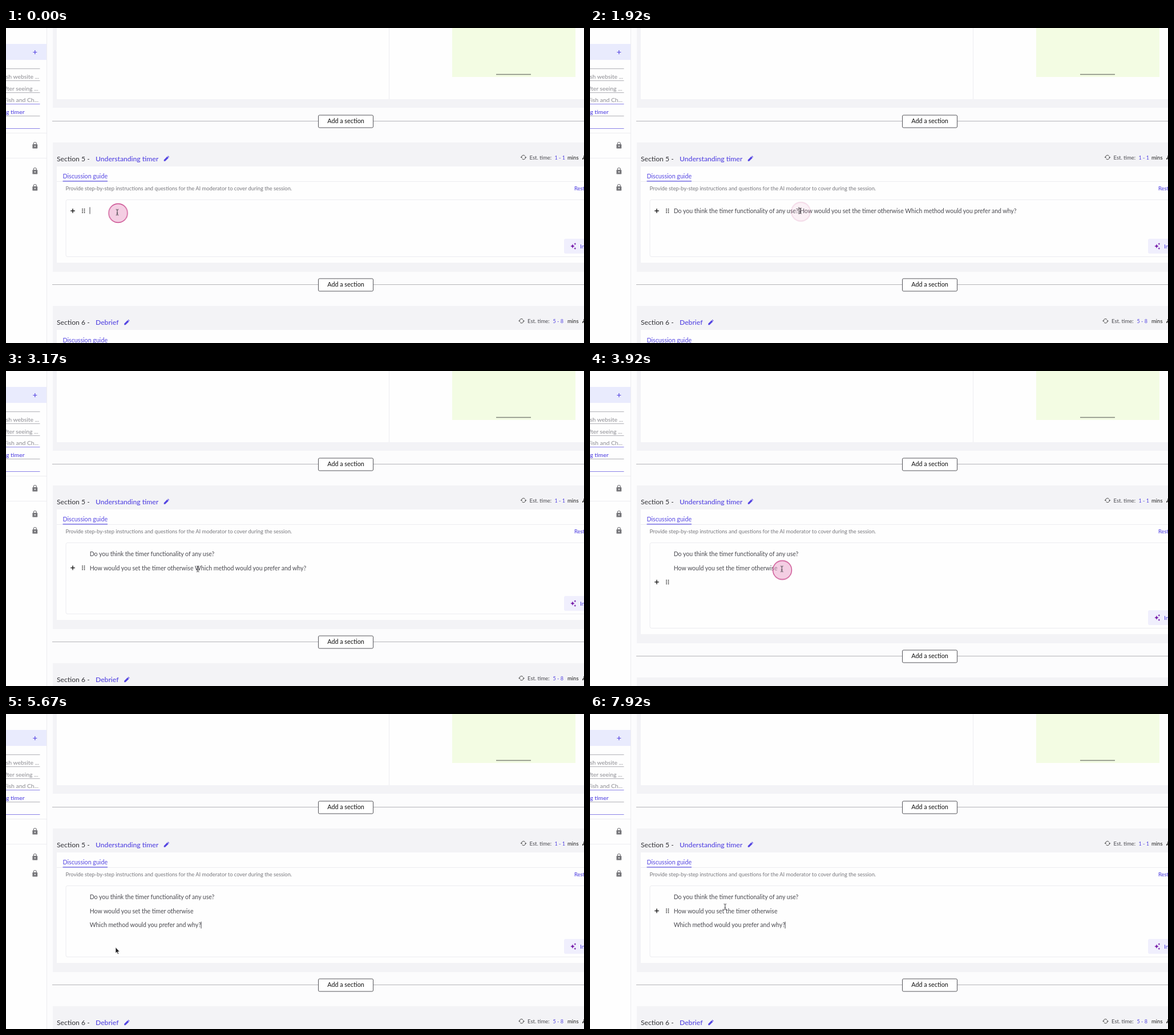
Recreate the animation shown at these times as an HTML page. Size 1013 by 553 pixels, loop 8 s.

```html
<!DOCTYPE html>
<html lang="en">
<head>
<meta charset="utf-8">
<title>Discussion guide editor</title>
<style>
  html, body { margin: 0; width: 100%; height: 100%; overflow: hidden; background: #fdfdfd; }
  svg { display: block; width: 100%; height: 100%; font-family: Lato, "Open Sans", sans-serif; }

  .band { fill: #f3f3f6; }
  .card { fill: #fefefe; }
  .page { fill: #fcfcfd; }
  .accent { fill: #5546e2; }
  .rule { stroke: #ececf0; fill: none; }
  .grey { stroke: #b0b0b6; }
  .violet { stroke: #8a82e8; }
  .title { font-size: 12.15px; fill: #333338; }
  .title .accent { font-weight: 500; }
  .tab { font-size: 10.7px; }
  .hint { font-size: 9.35px; fill: #77777c; }
  .meta { font-size: 9.5px; fill: #4a4a50; }
  .meta .accent { font-size: 9px; }
  .meta .mins { fill: #222; }
  .nav { font-size: 10.4px; fill: #8c8c92; text-anchor: end; }
  .button { font-size: 10.8px; font-weight: 500; text-anchor: middle; fill: #222; }
  .copy { font-size: 10.5px; fill: #48484e; }

  /* One shared 8 s clock */
  .run { animation: 8s step-end infinite; }
  #tail { animation-name: tail; }
  #pasted { animation-name: pasted; }
  #first { animation-name: first; }
  #joined { animation-name: joined; animation-timing-function: linear; }
  #second { animation-name: second; }
  #third { animation-name: third; animation-timing-function: linear; }
  #handle { animation-name: handle; }
  #caret { animation-name: caret; }
  #ring { animation-name: ring; animation-timing-function: linear; }
  #pointer { animation-name: pointer; animation-timing-function: ease-in-out; }
  #beam { animation-name: beam; }
  #arrow { animation-name: arrow; }

  @keyframes tail {
    0% { transform: none; }
    30.15% { transform: translateY(25px); }
    48.9% { transform: translateY(50px); }
    68.65%, 100% { transform: translateY(25px); }
  }
  @keyframes pasted { 0% { opacity: 0; } 7.2% { opacity: 1; } 30.15%, 100% { opacity: 0; } }
  @keyframes first { 0% { opacity: 0; } 30.15%, 100% { opacity: 1; } }
  @keyframes joined {
    0%, 30.14% { opacity: 0; }
    30.15%, 30.5% { opacity: .13; }
    31.4%, 48.88% { opacity: 1; }
    48.9%, 100% { opacity: 0; }
  }
  @keyframes second { 0% { opacity: 0; } 48.9%, 100% { opacity: 1; } }
  @keyframes third { 0%, 49.6% { opacity: 0; } 51%, 100% { opacity: 1; } }
  @keyframes handle {
    0% { transform: translateY(321px); opacity: 1; }
    4.1% { transform: translateY(321px); opacity: 0; }
    22.8% { transform: translateY(321px); opacity: 1; }
    30.15% { transform: translateY(345.5px); opacity: 1; }
    48.9% { transform: translateY(370.5px); opacity: 1; }
    60% { transform: translateY(396px); opacity: 1; }
    68.65% { transform: translateY(396px); opacity: 0; }
    76.5% { transform: translateY(370.5px); opacity: 1; }
    78% { transform: translateY(345.5px); opacity: 1; }
    79.8% { transform: translateY(321px); opacity: 1; }
    96.8%, 100% { transform: translateY(345.5px); opacity: 1; }
  }
  @keyframes caret {
    0% { transform: translate(147px, 320.5px); opacity: 1; }
    7.2% { transform: translate(746.5px, 320.5px); opacity: 0; }
    13.5% { transform: translate(746.5px, 320.5px); opacity: 1; }
    19.75% { transform: translate(746.5px, 320.5px); opacity: 0; }
    23.9% { transform: translate(366px, 320.5px); opacity: 1; }
    30.15% { transform: translate(147px, 345.5px); opacity: .5; }
    31.4% { transform: translate(147px, 345.5px); opacity: 1; }
    36.25% { transform: translate(147px, 345.5px); opacity: 0; }
    42.6% { transform: translate(329.5px, 345.5px); opacity: 1; }
    48.9% { transform: translate(147px, 370.5px); opacity: 0; }
    49.9% { transform: translate(147px, 370.5px); opacity: 1; }
    56.1% { transform: translate(147px, 370.5px); opacity: 0; }
    62.2% { transform: translate(147px, 370.5px); opacity: 1; }
    64.6% { transform: translate(147px, 396px); opacity: 1; }
    68.65% { transform: translate(342px, 370.5px); opacity: 1; }
    77.1% { transform: translate(342px, 370.5px); opacity: 0; }
    83.3% { transform: translate(342px, 370.5px); opacity: 1; }
    89.6% { transform: translate(342px, 370.5px); opacity: 0; }
    95.8%, 100% { transform: translate(342px, 370.5px); opacity: 1; }
  }
  @keyframes ring {
    0%, 3.3% { transform: translate(196.5px, 325px); opacity: 1; }
    5.2% { transform: translate(196.5px, 325px); opacity: 0; }
    23.5% { transform: translate(369.5px, 322.5px); opacity: 0; }
    25.5%, 31% { transform: translate(369.5px, 322.5px); opacity: 1; }
    33% { transform: translate(369.5px, 322.5px); opacity: 0; }
    41.5% { transform: translate(337px, 349.5px); opacity: 0; }
    43.5%, 49.8% { transform: translate(337px, 349.5px); opacity: 1; }
    52% { transform: translate(337px, 349.5px); opacity: 0; }
    64% { transform: translate(194px, 417px); opacity: 0; }
    65.6%, 68.65% { transform: translate(194px, 417px); opacity: 1; }
    70.8%, 100% { transform: translate(194px, 417px); opacity: 0; }
  }
  @keyframes pointer {
    0%, 12.6% { transform: translate(195px, 323.5px); }
    21.9%, 30.6% { transform: translate(368.3px, 321px); }
    39.6%, 54.1% { transform: translate(336.2px, 347.5px); }
    62.4%, 72.9% { transform: translate(193px, 415px); }
    81.2%, 93.8% { transform: translate(179.7px, 328px); }
    98.9%, 100% { transform: translate(236.7px, 338.5px); }
  }
  @keyframes beam { 0% { opacity: 1; } 59.5% { opacity: 0; } 76%, 100% { opacity: 1; } }
  @keyframes arrow { 0% { opacity: 0; } 59.5% { opacity: 1; } 76%, 100% { opacity: 0; } }
</style>
</head>
<body>
<svg viewBox="0 0 1013 553" preserveAspectRatio="none">
  <defs>
    <g id="lock">
      <path d="M-2.5-1V-3a2.5 2.5 0 0 1 5 0v2" fill="none" stroke="#77777b" stroke-width="1.2"/>
      <rect x="-4.4" y="-2" width="8.8" height="7.6" rx="1.2" fill="#77777b"/>
      <circle cy="1.7" r="1.1" fill="#fff"/>
    </g>
    <path id="pencil" class="accent" d="M-4.3 4.3V2L1.6-3.9 3.9-1.6-2 4.3ZM2.3-4.5 3.1-5.2 5.2-3.1 4.5-2.3Z"/>
    <g id="refresh" fill="none" stroke="#444">
      <path d="M-3.6.7A3.6 3.6 0 0 1 2.6-2.5M3.6-.7A3.6 3.6 0 0 1-2.6 2.5"/>
      <path d="M-5-.6-3.6 1-2.2-.4M5 .6 3.6-1 2.2.4"/>
    </g>
    <path id="star" d="M0-4Q.6-.6 4 0Q.6.6 0 4Q-.6.6-4 0Q-.6-.6 0-4Z"/>
    <path id="person" d="M1011 4v-2l2-1v-4" stroke="#222" stroke-width="1.4" fill="none"/>
    <g id="adder">
      <path d="M81 163.5H1013" stroke="#b4b4b8"/>
      <rect x="547.5" y="153" width="96" height="22" rx="2" fill="#fff" stroke="#55555a"/>
      <text class="button" x="595.5" y="167.4">Add a section</text>
    </g>
  </defs>

  <rect class="page" width="1013" height="553"/>

  <!-- Previous section -->
  <rect class="band" x="82" y="-5" width="940" height="145"/>
  <rect class="card" x="89" y="-5" width="930" height="130"/>
  <path class="rule" d="M671.5 0V125"/>
  <rect x="782" width="216" height="86" fill="#f3fce3"/>
  <path d="M859 81.5H920" stroke="#80857a" stroke-width="1.6"/>
  <use href="#adder"/>

  <!-- Current section -->
  <rect class="band" x="82" y="201" width="940" height="260"/>
  <rect class="card" x="89" y="243" width="930" height="160"/>
  <text class="title" y="233.6"><tspan x="89">Section 5 -</tspan><tspan class="accent" x="157">Understanding timer</tspan></text>
  <use href="#pencil" x="281" y="229.5"/>
  <use href="#refresh" x="907" y="227"/>
  <text class="meta" y="230.6"><tspan x="917.5">Est. time:</tspan><tspan class="accent" x="961.5">1 - 1</tspan><tspan class="mins" x="984">mins</tspan></text>
  <use href="#person" y="227"/>
  <path class="rule" d="M89 269.5H1013"/>
  <text class="tab accent" x="99.5" y="264.3">Discussion guide</text>
  <path d="M99.5 268.8H178" stroke="#6156e2" stroke-width="1.3"/>
  <text class="hint" x="104.5" y="285">Provide step-by-step instructions and questions for the AI moderator to cover during the session.</text>
  <text class="hint" x="996" y="285"><tspan class="accent" font-weight="500">Restore</tspan></text>
  <path class="rule" d="M1020 301.5H108a3 3 0 0 0-3 3V398"/>

  <!-- Everything pushed down as the editor grows -->
  <g id="tail" class="run">
    <rect class="page" x="72" y="428" width="945" height="180"/>
    <rect class="band" x="82" y="405" width="940" height="23"/>
    <rect class="card" x="89" y="335" width="930" height="77"/>
    <path class="rule" d="M1020 401.5H108a3 3 0 0 1-3-3V335"/>
    <rect x="978" y="370" width="50" height="26" rx="3" fill="#f0effd"/>
    <g fill="#7a22ad">
      <use href="#star" transform="translate(993 383)"/>
      <use href="#star" transform="translate(997.3 379) scale(.5)"/>
      <use href="#star" transform="translate(997.3 387) scale(.5)"/>
    </g>
    <text class="accent" x="1006" y="386.5" font-size="10.2">Insert</text>
    <use href="#adder" y="287"/>
    <rect class="band" x="82" y="488" width="940" height="100"/>
    <rect class="card" x="89" y="530" width="930" height="60"/>
    <text class="title" y="521"><tspan x="89">Section 6 -</tspan><tspan class="accent" x="157">Debrief</tspan></text>
    <use href="#pencil" x="211.5" y="517"/>
    <use href="#refresh" x="903.5" y="514.3"/>
    <text class="meta" y="517.8"><tspan x="914">Est. time:</tspan><tspan class="accent" x="958.5">5 - 8</tspan><tspan class="mins" x="984">mins</tspan></text>
    <use href="#person" y="514"/>
    <text class="tab accent" x="99.5" y="551.6">Discussion guide</text>
  </g>

  <!-- Sidebar -->
  <rect class="card" width="71" height="553"/>
  <path class="rule" d="M71.5 0V553M0 184.5H71M0 228.5H71"/>
  <rect y="28" width="71" height="28" fill="#e9ebfd"/>
  <path d="M47.3 42.5h7M50.8 39v7" stroke="#5546e2" stroke-width="1.2"/>
  <path class="grey" d="M0 71.5H59.5M0 92.5H59.5M0 113.5H59.5M0 154.5H59.5"/>
  <path class="violet" d="M0 133.5H59.5M0 176.5H59.5"/>
  <g class="nav">
    <text x="58" y="89">Fresh website ...</text>
    <text x="56.5" y="109.6">After seeing ...</text>
    <text x="57" y="130.3">Fish and Ch...</text>
    <text x="32.5" y="151" class="accent" font-weight="500">Understanding timer</text>
  </g>
  <use href="#lock" x="50.8" y="206"/>
  <use href="#lock" x="50.8" y="251"/>
  <use href="#lock" x="50.8" y="280"/>

  <!-- Editor text -->
  <g class="copy">
    <text id="pasted" class="run" x="146.7" y="324.6">Do you think the timer functionality of any use? How would you set the timer otherwise Which method would you prefer and why?</text>
    <text id="first" class="run" x="146.7" y="324.6">Do you think the timer functionality of any use?</text>
    <text id="joined" class="run" x="146.7" y="349.5">How would you set the timer otherwise Which method would you prefer and why?</text>
    <text id="second" class="run" x="146.7" y="349.5">How would you set the timer otherwise</text>
    <text id="third" class="run" x="146.7" y="374.4">Which method would you prefer and why?</text>
  </g>
  <g id="handle" class="run">
    <path d="M113.2 0h7.6M117-3.8v7.6" stroke="#222" stroke-width="1.5"/>
    <path d="M134-3h.01M134 0h.01M134 3h.01M137.5-3h.01M137.5 0h.01M137.5 3h.01" stroke="#333" stroke-width="1.9" stroke-linecap="round"/>
  </g>
  <path id="caret" class="run" d="M0-6V6" stroke="#44444a"/>

  <!-- Pointer -->
  <circle id="ring" class="run" r="16.5" fill="#eca6cc" fill-opacity=".55" stroke="#c9488c" stroke-width="1.3"/>
  <g id="pointer" class="run">
    <path id="beam" class="run" d="M-2.3-5Q0-5 0-3.5Q0-5 2.3-5M0-3.5V3.5M-2.3 5Q0 5 0 3.5Q0 5 2.3 5M-1.2 1.5H1.2" fill="none" stroke="#38383c"/>
    <path id="arrow" class="run" d="M-1-5.5V5L1.3 2.8 2.9 6.6 4.6 5.9 3 2.2H6.2Z" fill="#1c1c1e" stroke="#fff" stroke-width=".7"/>
  </g>
</svg>
</body>
</html>
```
